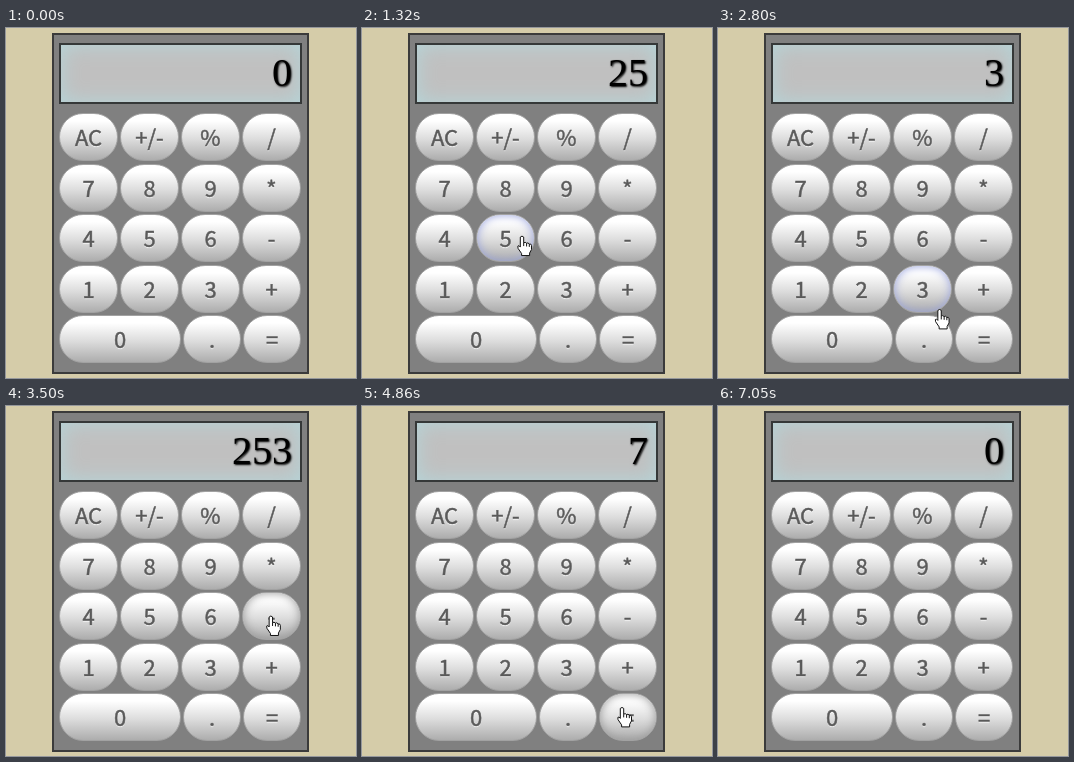
These frames come from a looping animation (350 by 350 pixels, 7080 ms). An HTML page:

```html
<!DOCTYPE html>
<html lang="en">
<head>
<meta charset="utf-8">
<title>Calculator</title>
<style>
  html, body { margin: 0; width: 100%; height: 100%; overflow: hidden; background: #d5cca9; }
  div, svg { position: absolute; box-sizing: border-box; }
  #body { left: 46px; top: 5px; width: 257px; height: 341px; background: #808080; border: 2px solid #3b3b3b; }
  #screen {
    left: 53px; top: 15px; width: 243px; height: 61px; padding-right: 8px;
    background: #c0c0c0; border: 2px solid #353838;
    box-shadow: inset 0 0 20px #b4d6da;
    font: 40px/55px "Liberation Serif", "Times New Roman", serif;
    text-align: right; color: #000; text-shadow: 1px 1px 2px #000;
  }
  .key {
    height: 48px; border: 1px solid #a2a2a2; border-radius: 25px; text-align: center;
    background: linear-gradient(#fff 15%, #dcdcdc 55%, #adadad);
    font: 22px/44px "Noto Sans CJK JP", "Noto Sans CJK SC", "Noto Sans CJK", "Noto Sans", sans-serif;
    color: #5a5a5a; -webkit-text-stroke: .5px #5a5a5a; text-shadow: 0 1px 1px #fff; white-space: nowrap;
  }
  .hover { box-shadow: inset 0 0 10px #999; }
  .active { box-shadow: inset 0 0 10px #98a2dc; }
  #pointer { left: 0; top: 0; width: 350px; height: 350px; }
  #pointer path { fill: #fff; stroke: #111; stroke-width: 1; stroke-linejoin: round; }
</style>
</head>
<body>
<div id="body"></div>
<div id="screen">0</div>
<div id="keys"></div>
<svg id="pointer" viewBox="0 0 350 350">
  <g id="hand">
    <path d="M-1.7 11V1Q0-.9 1.7 1V6.8Q3.2 5.4 4.6 7.2Q6 6 7.3 8Q9 7.2 9.5 9.4V13.5L7.6 17V19.5H-.4V17.5L-4 12.2Q-4.8 9.2-3 9.6Z"/>
    <path d="M1.7 6.8V10M4.6 7.2V10.4M7.3 8V10.8"/>
  </g>
</svg>
<script>
const LOOP = 7080, ENTER = 370;
const HOLD = 150;  // a pressed key glows this long
const LEAVE = 60;  // the hand moves on this long after a press
const LAG = 30;    // hover follows the hand with this delay
const KEY_H = 48, RIGHT_EDGE = 302;
const $ = id => document.getElementById(id);

const keys = {};

function addKey(label, x, row, w) {
  const y = 85 + 50.6 * row;
  const el = document.createElement("div");
  el.className = "key";
  el.textContent = label;
  Object.assign(el.style, { left: x + "px", top: y + "px", width: w + "px" });
  $("keys").append(el);
  keys[label] = { el, x, y, w };
}

["AC +/- % /", "7 8 9 *", "4 5 6 -", "1 2 3 +"].forEach((labels, row) =>
  labels.split(" ").forEach((label, col) => addKey(label, 53 + 61 * col, row, 59)));
addKey("0", 53, 4, 122);
addKey(".", 177, 4, 58);
addKey("=", 237, 4, 58);

// key, press time, how far above its centre the hand rests
const presses = [
  ["2", 850, 4], ["5", 1185, 3], ["6", 1660, 0], ["-", 2060, 0], ["3", 2690, -16],
  ["=", 3260, 4], ["*", 3720, 0], ["7", 4290, -1], ["=", 4930, 10], ["AC", 5940, 8]
].map(([label, time, lift]) => ({ label, time, lift }));

const stops = [
  { x: 140, y: 346, leave: ENTER },
  ...presses.map(({ label, time, lift }) => {
    const { x, y, w } = keys[label];
    return { x: x + w / 2 - 0.6 * lift, y: y + KEY_H / 2 - lift, leave: time + LEAVE };
  }),
  { x: 640, y: 260, leave: LOOP }
];

function handAt(t) {
  if (t < ENTER) return null;
  const i = stops.findIndex(s => s.leave > t);
  const a = stops[i - 1], b = stops[i];
  const glide = Math.min(400, 150 + Math.hypot(b.x - a.x, b.y - a.y));
  const k = Math.min(1, (t - a.leave) / glide);
  const e = k * k * (3 - 2 * k);
  const x = a.x + (b.x - a.x) * e;
  return x > RIGHT_EDGE ? null : { x, y: a.y + (b.y - a.y) * e };
}

const operate = {
  "+": (a, b) => a + b,
  "-": (a, b) => a - b,
  "*": (a, b) => a * b,
  "/": (a, b) => a / b
};

function displayAt(t) {
  let shown = 0, stored = 0, op = null, fresh = true;
  for (const { label, time } of presses) {
    if (time > t) break;
    if (label in operate) {
      stored = shown;
      op = label;
      fresh = true;
    } else if (label === "=") {
      shown = operate[op](stored, shown);
      fresh = true;
    } else if (label === "AC") {
      shown = 0;
      fresh = true;
    } else {
      shown = (fresh ? 0 : shown * 10) + Number(label);
      fresh = false;
    }
  }
  return String(shown);
}

function isOver(key, p) {
  return p !== null && p.x >= key.x && p.x <= key.x + key.w && p.y >= key.y && p.y <= key.y + KEY_H;
}

function draw(t) {
  $("screen").textContent = displayAt(t);

  const pressed = presses.find(p => t >= p.time && t < p.time + HOLD);
  const seen = handAt(t - LAG);
  for (const label in keys) {
    const key = keys[label];
    const active = pressed !== undefined && pressed.label === label;
    key.el.classList.toggle("active", active);
    key.el.classList.toggle("hover", !active && isOver(key, seen));
  }

  const p = handAt(t);
  $("hand").style.display = p ? "" : "none";
  if (p) $("hand").setAttribute("transform", `translate(${p.x} ${p.y})`);
}

const start = performance.now();
function tick() {
  draw((performance.now() - start) % LOOP);
  requestAnimationFrame(tick);
}
tick();
</script>
</body>
</html>
```
